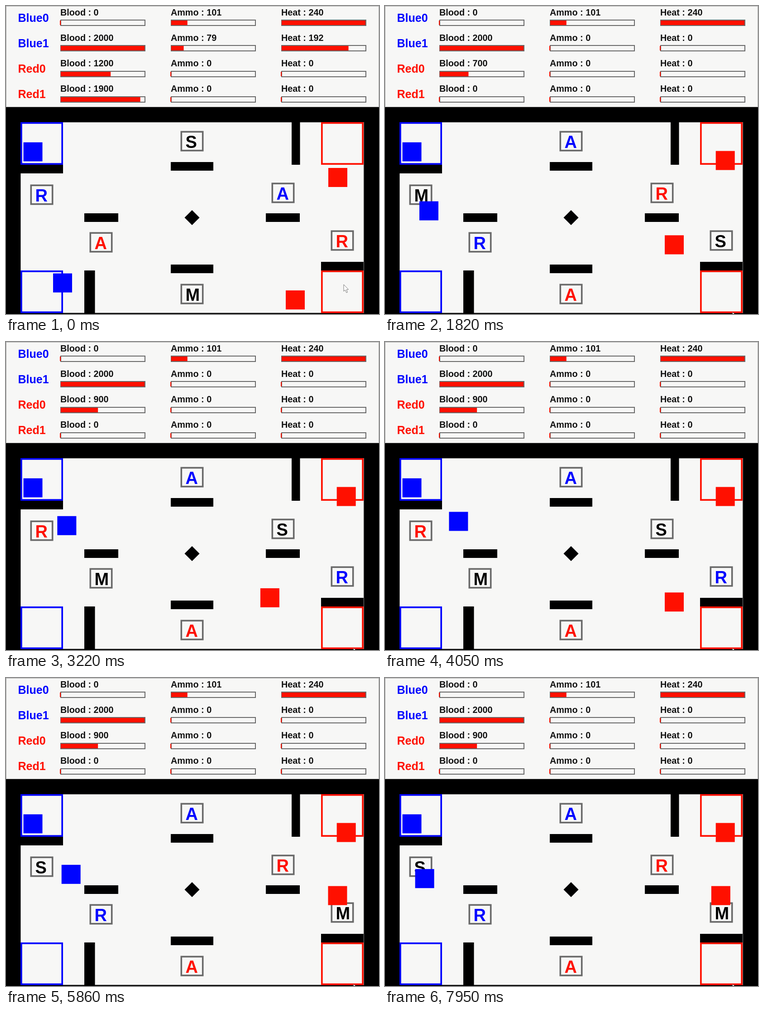
An HTML page with a canvas that plays this animation: 824 px wide and 679 px high, repeating every 8000 ms.

```html
<!DOCTYPE html>
<html lang="en">
<head>
<meta charset="utf-8">
<title>Robot arena</title>
<style>
  html, body { margin: 0; width: 100%; height: 100%; overflow: hidden; background: #000; }
  canvas { display: block; }
</style>
</head>
<body>
<canvas id="stage" width="824" height="679"></canvas>
<script>
const ctx = document.getElementById('stage').getContext('2d');
const LOOP = 8000, START = 80, BEAT = 832, CELL = 9.35;
const BLUE = '#0004ff', RED = '#ff1000', PAPER = '#f7f7f6', GRAY = '#696969', BLACK = '#000';
const FONT = '"Liberation Sans", Arial, sans-serif';
const center = { x: 411, y: 466.5 };

// The arena is point-symmetric: each box also appears turned by half a circle.
const withTwins = boxes => boxes.flatMap(([x, y, w, h]) =>
  [[x, y, w, h], [2 * center.x - x - w, 2 * center.y - y - h, w, h]]);

const walls = [
  ...withTwins([[32, 350, 94, 19], [364, 344, 94, 19], [173, 457, 75, 19]]),
  [631, 256, 18.5, 94], [173, 583, 23.5, 94]
];
const zones = withTwins([[385.5, 275.5, 51, 45], [53.5, 393.5, 51, 45], [586.5, 389.5, 51, 45]]);

// Zone labels after each shuffle; the suffix gives the team.
const shuffles = ['S M Rb Rr Ab Ar', 'Ab Ar M S Rr Rb', 'Ab Ar Rr Rb S M', 'Ab Ar S M Rr Rb']
  .map(row => row.split(' '));

// Every beat a robot walks to its next stop, given in cells from its first place.
const robots = [
  { color: BLUE, x: 38.5, y: 300.5, stops: [] },
  { color: BLUE, x: 104, y: 589.5, stops: [
    [-3, -12], [-3, -17], [-6, -19], [1, -22], [4, -23],
    [8, -23], [2, -19], [2, -23], [-5, -15], [-3, -21]] },
  { color: RED, x: 618, y: 627, stops: [
    [3, -13], [0, -13], [-1, -16], [-6, -9], [0, -8], [10, -18], [10, -18], [11, -18]] },
  { color: RED, x: 712, y: 357, stops: [[0, -10], [2, -4]] }
];

const gauges = [
  { label: 'Blood', x: 120, max: 2000 },
  { label: 'Ammo', x: 364, max: 500 },
  { label: 'Heat', x: 608, max: 240 }
];

const clamp = (v, low, high) => Math.min(high, Math.max(low, v));
const snap = (v, unit) => Math.max(0, Math.round(v / unit) * unit);

// Blue1 fires until it is empty, then cools down; both red robots take the hits.
function teamStats(t) {
  const ammo = 79;
  const shots = clamp(Math.floor((t - START) / 16.2), 0, ammo);
  const cooling = Math.max(0, (t - START - ammo * 16.2) * 0.6);
  const supply = 100 * clamp(Math.floor((t - 2600) / 100), 0, 2);
  return [
    ['Blue0', BLUE, 0, 101, 240],
    ['Blue1', BLUE, 2000, ammo - shots, snap(192 - shots * 0.2 - cooling, 12)],
    ['Red0', RED, snap(1200 - shots * 6.5, 100) + supply, 0, 0],
    ['Red1', RED, snap(1900 - shots * 23.7, 100), 0, 0]
  ];
}

// Walks cell by cell through the middle of each beat and rests around it.
function position(robot, t) {
  const beats = Math.max(0, t - START) / BEAT;
  const leg = Math.floor(beats);
  const stop = i => i < 0 ? [0, 0] : robot.stops[Math.min(i, robot.stops.length - 1)] || [0, 0];
  const [x0, y0] = stop(leg - 1), [x1, y1] = stop(leg);
  const hops = Math.max(Math.abs(x1 - x0), Math.abs(y1 - y0), 1);
  const u = Math.round(clamp((beats - leg - 0.16) / 0.6, 0, 1) * hops) / hops;
  return [robot.x + CELL * (x0 + (x1 - x0) * u), robot.y + CELL * (y0 + (y1 - y0) * u)];
}

function fill(color, x, y, w, h) {
  ctx.fillStyle = color;
  ctx.fillRect(x, y, w, h);
}

// Outline drawn inside the given box
function frame(color, x, y, w, h, line) {
  ctx.strokeStyle = color;
  ctx.lineWidth = line;
  ctx.strokeRect(x + line / 2, y + line / 2, w - line, h - line);
}

function text(str, x, y, size, color) {
  ctx.font = `bold ${size}px ${FONT}`;
  ctx.fillStyle = color;
  ctx.fillText(str, x, y);
}

function drawGauge({ label, x, max }, value, row) {
  const top = Math.round(30 + row * 56.3);
  text(`${label} : ${value}`, x, 21 + row * 56, 19.8, '#111');
  frame(GRAY, x, top, 188, 14, 2);
  if (value) fill(RED, x + 1, top + 2, 187 * value / max - 2, 10);
  else fill(RED, x - 1, top + 2, 2, 10);
}

function drawPanel(t) {
  fill(PAPER, 0, 0, 824, 222.5);
  frame('#aaa', 0, 0, 824, 223, 1);
  teamStats(t).forEach(([name, color, ...values], row) => {
    text(name, 26.5, 35 + row * 56, 25, color);
    gauges.forEach((gauge, i) => drawGauge(gauge, values[i], row));
  });
}

function drawArena(t) {
  fill(PAPER, 32, 256, 758.5, 421);
  frame('#999', 32, 256, 758.5, 421, 1);
  walls.forEach(wall => fill(BLACK, ...wall));
  for (const y of [256, 583]) {
    frame(BLUE, 32, y, 94, 94, 3.7);
    frame(RED, 696, y, 94, 94, 3.7);
  }

  ctx.save();
  ctx.translate(center.x, center.y);
  ctx.rotate(Math.PI / 4);
  fill(BLACK, -11.7, -11.7, 23.4, 23.4);
  ctx.restore();

  const labels = shuffles[Math.min(3, Math.floor(t / 1400))];
  zones.forEach(([x, y, w, h], i) => {
    const [letter, team] = labels[i];
    frame(GRAY, x, y, w, h, 3.6);
    text(letter, x + 11, y + 37, 38, { b: BLUE, r: RED }[team] || BLACK);
  });
  robots.forEach(robot => fill(robot.color, ...position(robot, t), 42, 42));
}

function drawPointer(t) {
  const u = clamp((t - 1300) / 250, 0, 1);
  ctx.save();
  ctx.translate(746 + 22 * u, 614 + 61 * u);
  const arrow = new Path2D('M0 0V15L3.3 12L6 18L8.5 17L6 11.3L10.5 11Z');
  ctx.fillStyle = '#fff';
  ctx.fill(arrow);
  ctx.strokeStyle = '#777';
  ctx.lineWidth = 1;
  ctx.stroke(arrow);
  ctx.restore();
}

function draw(now) {
  const t = now % LOOP;
  fill(BLACK, 0, 0, 824, 679);
  drawPanel(t);
  drawArena(t);
  drawPointer(t);
  requestAnimationFrame(draw);
}
requestAnimationFrame(draw);
</script>
</body>
</html>
```
